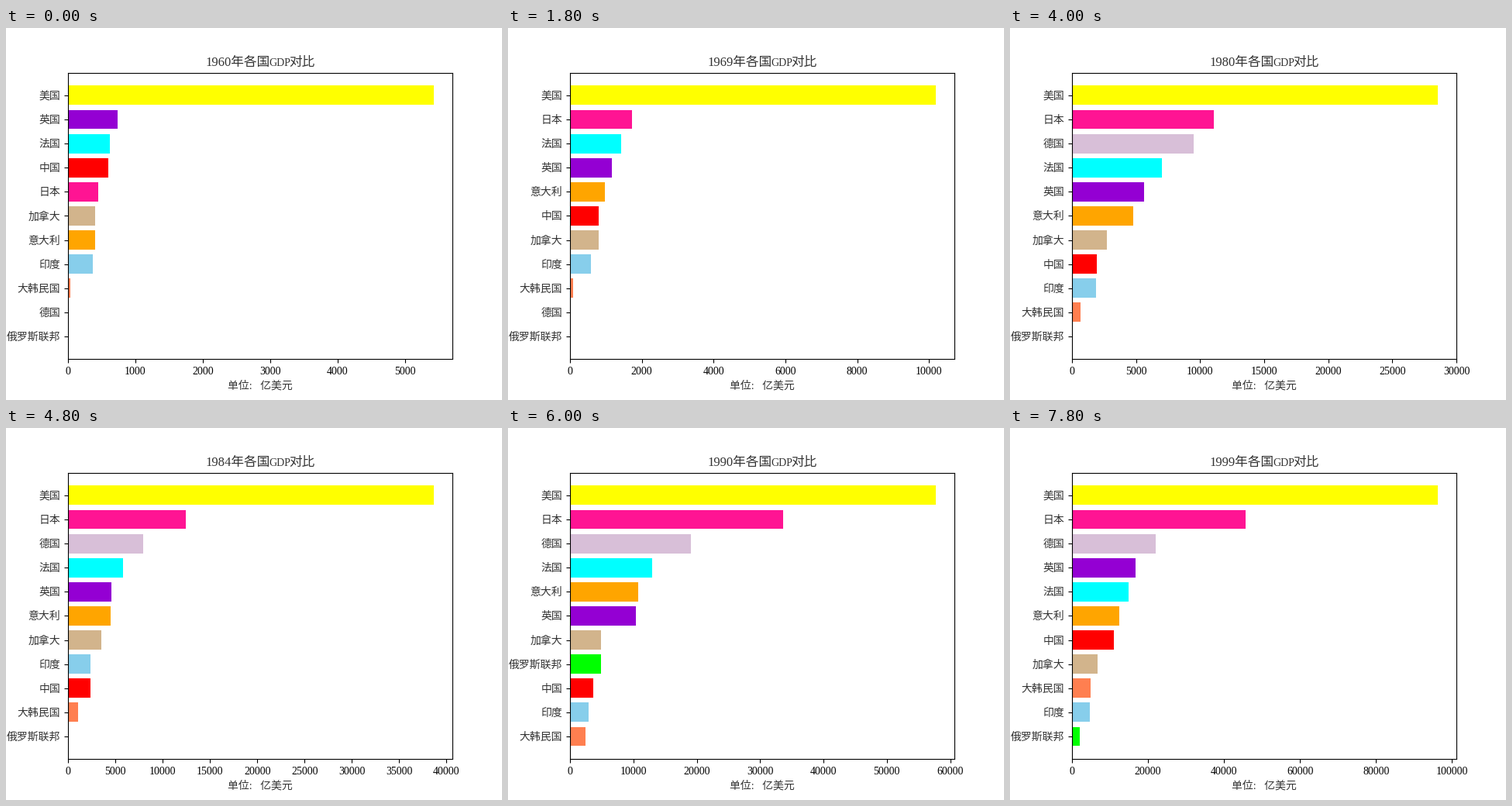
Recreate the animation shown at these times as a matplotlib script. Size 640 px wide and 480 px high, loop 8 s.

```python
import numpy as np
import matplotlib.pyplot as plt
from matplotlib.animation import FuncAnimation

plt.rcParams["font.family"] = ["Liberation Serif", "Noto Sans CJK JP"]

FIRST, COUNT = 1960, 40
YEARS = np.arange(COUNT)        # years since FIRST
KEYS = [0, 9, 15, 20, 27, 34, 39]
INK = "0.2"

# Exchange rates: a strong dollar in the mid eighties, a weak one after 1990
EUROPE = np.interp(YEARS, [20, 22, 25, 27, 30, 32, 34, 35, 39],
                   [1, .78, .66, 1, 1.17, 1.17, 1, 1.1, 1])
YEN = np.minimum(EUROPE, 1)


def grow(*values, rate=1, start=0):
    """Steady growth through the values at the last KEYS, zero before start."""
    path = np.exp(np.interp(YEARS, KEYS[-len(values):], np.log(values)))
    return np.where(YEARS < start, 0, path * rate)


# Name, yearly values in 10^9 dollars, colour
COUNTRIES = [
    ("俄罗斯联邦", grow(570, 395, 196, start=28), "lime"),
    ("德国", grow(183, 490.6, 950, 1298, 2205, 2195, rate=EUROPE, start=10),
     "thistle"),
    ("大韩民国", grow(4, 7.7, 21.8, 65.4, 148, 464, 497), "coral"),
    ("印度", grow(37, 58.4, 98.5, 186.3, 279, 327, 462), "skyblue"),
    ("意大利", grow(40.4, 97.1, 227.7, 477, 805, 1099, 1252, rate=EUROPE),
     "orange"),
    ("加拿大", grow(40.5, 79.1, 173.8, 274, 431, 578, 676), "tan"),
    ("日本", grow(44.3, 172, 521.5, 1105, 2533, 4907, 4562, rate=YEN),
     "deeppink"),
    ("中国", grow(59.7, 79.7, 163.4, 191, 273, 564, 1094), "red"),
    ("法国", grow(62.2, 141.9, 360.8, 701, 934, 1394, 1493, rate=EUROPE),
     "cyan"),
    ("英国", grow(73.2, 116.5, 241.8, 565, 743, 1140, 1682, rate=EUROPE),
     "darkviolet"),
    ("美国", grow(543.3, 1019.9, 1684.9, 2857.3, 4855, 7287, 9631), "yellow"),
]

fig, ax = plt.subplots(figsize=(6.4, 4.8), dpi=100)


def put(x, y, text, size, ha):
    return fig.text(x / 640, 1 - y / 480, text, size=size, ha=ha,
                    va="baseline", color=INK)


title = put(340.5, 49.3, "", 12, "right")
put(353, 49.3, "GDP", 10, "center")
put(365.5, 49.3, "对比", 12, "left")
put(328, 466, "单位:   亿美元", 10, "center")


def draw(i):
    rows = sorted(COUNTRIES, key=lambda c: c[1][i])
    names, paths, colors = zip(*rows)
    ax.clear()
    ax.barh(names, [10 * p[i] for p in paths], color=colors)
    ax.tick_params(axis="y", labelcolor=INK)
    title.set_text(f"{FIRST + i}年各国")
    return []


anim = FuncAnimation(fig, draw, frames=COUNT, interval=200,
                     init_func=lambda: draw(0), repeat=True, repeat_delay=0)
plt.show()
```
